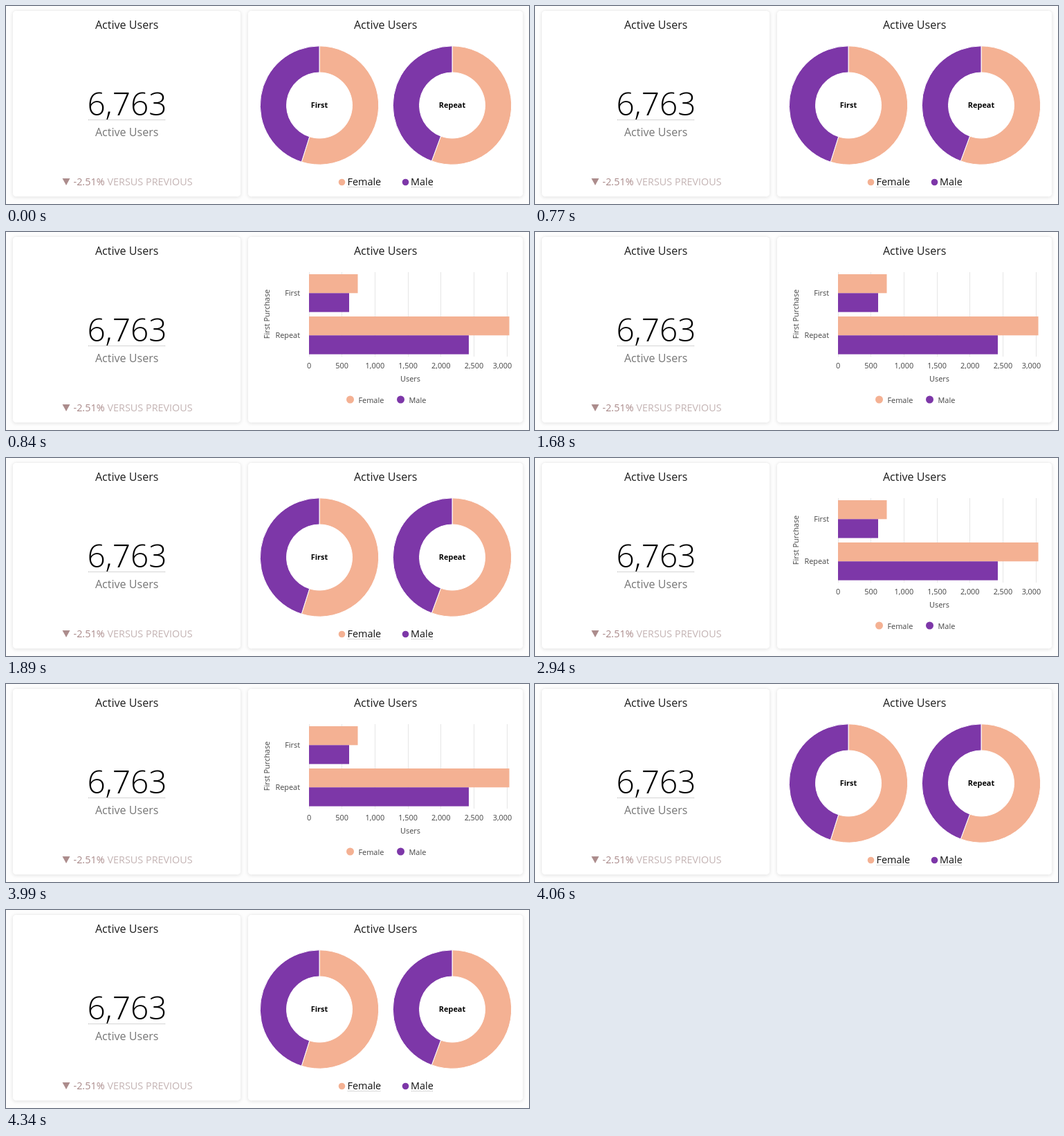
An HTML page that plays this animation: 756x286 px, repeating every 4.69 s.

```html
<!DOCTYPE html>
<html lang="en">
<head>
<meta charset="utf-8">
<title>Active Users</title>
<style>
  html, body { margin: 0; width: 100%; height: 100%; overflow: hidden; background: #fdfdfd; }
  svg { display: block; width: 756px; height: 286px; font-family: "Open Sans", sans-serif; }
  .card { fill: #fff; stroke: #f0f0f0; filter: drop-shadow(0 1px 2px rgba(0, 0, 0, .09)); }
  .mid { text-anchor: middle; }
  .end { text-anchor: end; }
  .title { font-size: 16.1px; fill: #1c1c1c; }
  .dots { stroke: #aaa; stroke-dasharray: 1 1; }
  .legend { font-size: 14.4px; fill: #111; }
  .small { font-size: 10.9px; fill: #444; }
  .hub { font-size: 10.9px; font-weight: 700; fill: #000; }
  .grid { stroke: #e6e6e6; }
</style>
</head>
<body>
<svg viewBox="0 0 756 286">
  <rect class="card" x="9.5" y="6.5" width="330" height="269" rx="5"/>
  <rect class="card" x="349.5" y="6.5" width="398" height="269" rx="5"/>
  <text class="title mid" x="174.7" y="33">Active Users</text>
  <text class="title mid" x="548.7" y="33">Active Users</text>

  <text class="mid" x="175" y="158" font-size="46" font-weight="300">6,763</text>
  <path class="dots" d="M119 164.5H231"/>
  <text class="title mid" x="174.7" y="188" style="fill:#767676">Active Users</text>
  <path d="M81.5 249H92.5L87 259Z" fill="#ac8c8c"/>
  <text x="97.5" y="259" font-size="14.4" fill="#a98989">-2.51%</text>
  <text x="146.5" y="259" font-size="14.4" fill="#c4b4b4">VERSUS PREVIOUS</text>

  <g id="donuts"></g>
  <g id="bars"></g>
</svg>
<script>
const FEMALE = '#f4b193', MALE = '#7d37a8';
const groups = [
  { name: 'First', female: 739, male: 608, cx: 453, top: 61 },
  { name: 'Repeat', female: 3035, male: 2421, cx: 645, top: 122 },
];
const donuts = document.getElementById('donuts');
const bars = document.getElementById('bars');

const text = (cls, x, y, label) => `<text class="${cls}" x="${x}" y="${y}">${label}</text>`;
const dot = (x, y, r, color) => `<circle cx="${x}" cy="${y}" r="${r}" fill="${color}"/>`;

// Ring slice between two fractions of a turn, clockwise from the top.
function slice(cx, from, to, color) {
  const cy = 143.5, outer = 85.7, inner = 47.5;
  const point = (r, turn) => {
    const a = turn * 2 * Math.PI;
    return `${cx + r * Math.sin(a)} ${cy - r * Math.cos(a)}`;
  };
  const large = to - from > .5 ? 1 : 0;
  return `<path fill="${color}" stroke="#fff" d="M${point(outer, from)}
    A${outer} ${outer} 0 ${large} 1 ${point(outer, to)}L${point(inner, to)}
    A${inner} ${inner} 0 ${large} 0 ${point(inner, from)}Z"/>`;
}

donuts.innerHTML = groups.map(g => {
  const share = g.female / (g.female + g.male);
  return slice(g.cx, 0, share, FEMALE) + slice(g.cx, share, 1, MALE) +
    text('hub mid', g.cx, 146.5, g.name);
}).join('') +
  dot(485.5, 254.5, 4.8, FEMALE) + text('legend', 493.5, 259, 'Female') +
  dot(577.5, 254.5, 4.8, MALE) + text('legend', 585, 259, 'Male') +
  '<path class="dots" d="M494 261.5H542M586 261.5H618"/>';

const scaleX = value => 438 + value * .0954;
const bar = (value, y, color) =>
  `<rect x="438" y="${y}" width="${scaleX(value) - 438}" height="27.3" fill="${color}"/>`;

const ticks = [0, 500, 1000, 1500, 2000, 2500, 3000];
bars.innerHTML = ticks.map(v => {
  const x = scaleX(v), lineX = Math.floor(x) + .5;
  return `<path class="grid" d="M${lineX} 58V180"/>` +
    text('small mid', Math.min(x, 717.5), 197, v.toLocaleString('en-US'));
}).join('') + groups.map(g =>
  bar(g.female, g.top, FEMALE) + bar(g.male, g.top + 27.3, MALE) +
  text('small end', 425, g.top + 31, g.name)
).join('') +
  '<text class="small mid" transform="translate(381 118.5) rotate(-90)">First Purchase</text>' +
  text('small mid', 584.5, 216, 'Users') +
  dot(497.5, 242, 5.5, FEMALE) + text('small', 509.5, 247, 'Female') +
  dot(570.5, 242, 5.5, MALE) + text('small', 582.5, 247, 'Male');

const LOOP = 4690;
const barTimes = [[840, 1890], [2940, 4060]];

function draw(now) {
  const t = now % LOOP;
  const showBars = barTimes.some(([start, end]) => t >= start && t < end);
  bars.style.display = showBars ? '' : 'none';
  donuts.style.display = showBars ? 'none' : '';
}

let begin;
function frame(now) {
  begin ??= now;
  draw(now - begin);
  requestAnimationFrame(frame);
}
draw(0);
requestAnimationFrame(frame);
</script>
</body>
</html>
```
